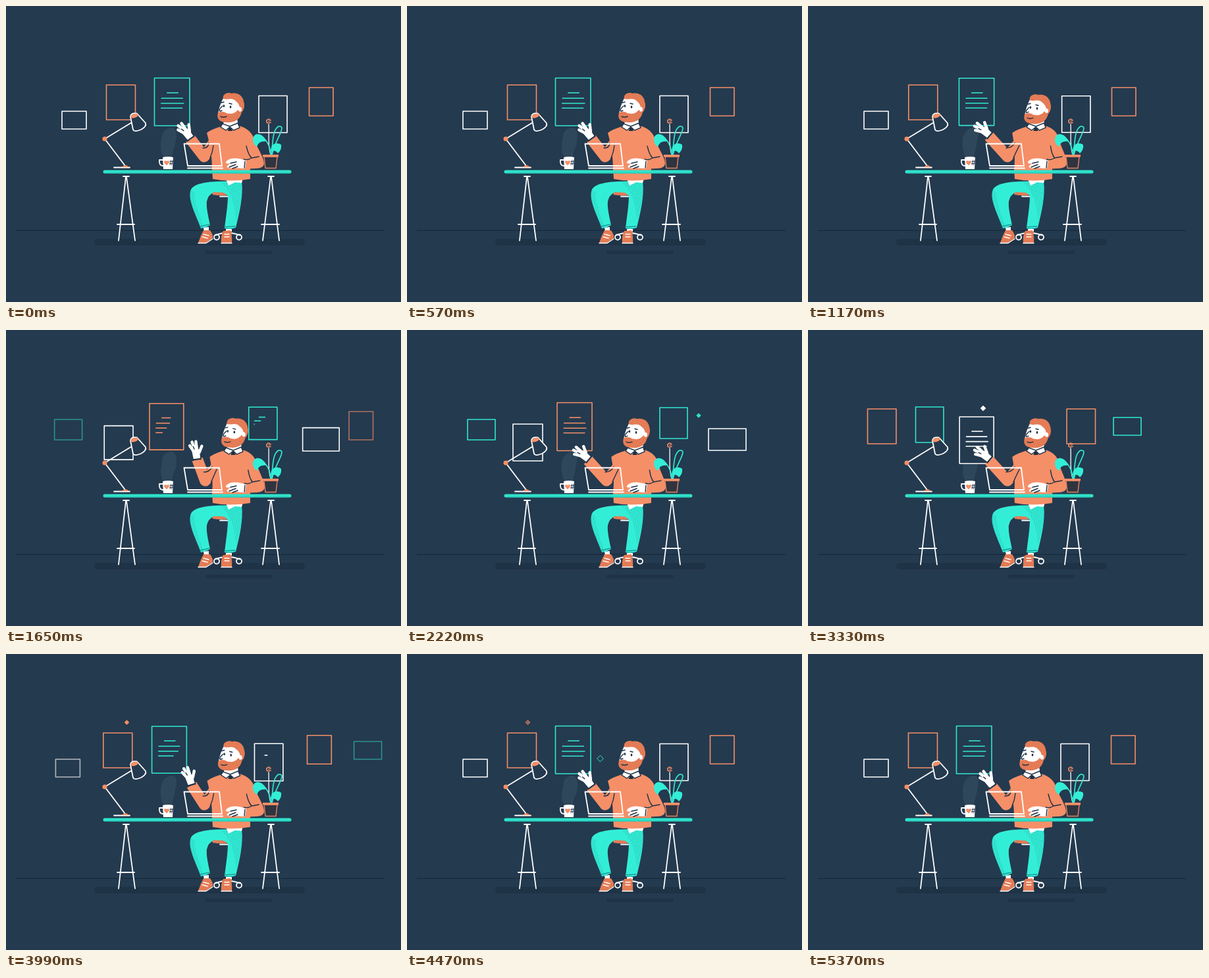
Write an HTML page that moves like this. It is 600 px wide and 450 px high and loops after 5.4 s.

```html
<!DOCTYPE html>
<html lang="en">
<head>
<meta charset="utf-8">
<title>Desk</title>
<style>
  html, body { margin: 0; width: 100%; height: 100%; overflow: hidden; background: #243a4f; }
  svg { display: block; width: 100vw; height: 100vh; }
  .line { fill: none; stroke-linecap: round; stroke-linejoin: round; }
  .white { stroke: #fff; stroke-width: 1.8; }
  .ink { stroke: #1d3044; stroke-width: 1.4; }
  .teal { stroke: #30e8cf; stroke-width: 1.7; }
  .orange { stroke: #f58f68; stroke-width: 1.6; }
  .o { fill: #f58f68; }
  .t { fill: #33eed6; }
  .w { fill: #fff; }
  .d { fill: #1d3044; }
  .shade { fill: #1f3346; }
  .hash { font: bold 11px "Liberation Sans", Arial, sans-serif; }
</style>
</head>
<body>
<svg viewBox="0 0 600 450">
  <defs>
    <pattern id="curls" width="4" height="4" patternUnits="userSpaceOnUse" patternTransform="rotate(25)">
      <rect width="4" height="4" fill="#ee845c"/>
      <circle cx="1" cy="1" r=".8" fill="#bd5a3c"/>
      <circle cx="3" cy="3" r=".7" fill="#bd5a3c"/>
    </pattern>
    <pattern id="denim" width="4" height="4" patternUnits="userSpaceOnUse" patternTransform="rotate(35)">
      <circle cx="1" cy="1" r=".7" fill="#1b9d9c"/>
      <circle cx="3" cy="3" r=".6" fill="#1b9d9c"/>
    </pattern>
  </defs>

  <!-- floor -->
  <rect class="shade" x="134" y="354" width="320" height="10" rx="5"/>
  <rect class="shade" x="303" y="372" width="102" height="5.500" rx="2.700"/>
  <path d="M15 341.300H575" stroke="#172a3c" stroke-width="1.200"/>

  <path id="steam" fill="#2e475b"/>
  <g id="cards"></g>
  <g id="sparks"></g>

  <!-- chair -->
  <path fill="url(#curls)" d="M312 281H340V287Q326 289 314 287Z"/>
  <path class="line white" d="M325 289.500H338M318 348.500Q336 341 355 348.500"/>
  <circle class="line white" cx="320" cy="351.500" r="4"/>
  <circle class="line white" cx="354" cy="351.500" r="4"/>

  <!-- legs -->
  <path class="t" d="M322 267L358 266C361 290 354 316 349 337Q341 340 332 338C334 320 337 303 337 288L330 283Z"/>
  <path class="t" d="M344 267C318 266 287 267 281 279C275 293 288 316 296 338Q304 337 310 333C307 319 304 306 305 297Q307 287 316 283L342 284Z"/>
  <path fill="url(#denim)" d="M326 268L358 267C361 290 354 312 350 326C347 312 347 298 340 287Q334 274 326 268Z"/>
  <path fill="url(#denim)" d="M281 281C276 293 288 316 296 338L300 337C293 314 286 297 286 283Z"/>
  <path class="line" d="M295 335L309 332M332 336L348 335" stroke="#1b9d9c" stroke-width="1.300"/>
  <path class="w" d="M300 337L308 336V342H301ZM334 339H343V343H334Z"/>
  <path fill="url(#curls)" d="M300 341L310 341Q315 348 314 353L304 360H292Q295 350 300 341ZM330 342L341 341Q344 350 343 360H327Q326 349 330 342Z"/>
  <path class="line" d="M292 360.500H304L314 354M327 360.500H343M300 347L308 349M298 351L306 353M332 347H339M332 351H339" stroke="#fff" stroke-width="1.400"/>

  <!-- hem -->
  <path class="w" d="M334 263L360 262L358 269L348 268L338 273Z"/>
  <path class="o" d="M313 246H371L371 263Q340 268 314 263Z"/>

  <g id="body">
    <path class="o" d="M305 193C312 187 322 185 329 182H353C366 185 374 192 378 205C383 219 392 230 392 240Q391 247 380 247L313 250C313 230 311 214 305 193Z"/>
    <path class="line ink" d="M365 213Q368 226 373 231L384 229M373 231Q367 235 361 233"/>
    <path class="w" d="M331 171L351 170L353 185L340 188L330 184Z"/>
    <path class="w ink" d="M329 179L326 184L334 189L340 184L346 189L355 185L352 178L340 183Z"/>
    <path class="d" d="M338 185L342 185L344 190H337Z"/>
  </g>
  <g id="head">
    <path class="w" d="M330 140C326 148 323 156 322 165L350 171L359 157C358 146 346 138 330 140Z"/>
    <path fill="url(#curls)" d="M330 141C328 134 337 130 343 133C352 131 360 137 361 145C363 151 362 157 358 162L355 156C355 149 351 146 346 142C340 140 335 143 330 141Z"/>
    <path fill="url(#curls)" d="M322 162Q330 159 335 163Q346 166 352 158L358 160C357 171 348 178 336 177C325 177 319 172 322 162Z"/>
    <ellipse class="w" cx="355.500" cy="157" rx="2.500" ry="3.500"/>
    <path class="line ink" d="M329 152Q322 158 325 160L328 159M326 168Q330 170 335 168M327 147L331 146M339 148L343 149"/>
    <ellipse class="d" cx="331" cy="152" rx="1.200" ry="1.900"/>
    <ellipse class="d" cx="341" cy="153.500" rx="1.300" ry="2"/>
  </g>

  <g id="arm">
    <path id="sleeve" class="line" stroke="#f58f68" stroke-width="17" style="stroke-linecap:butt"/>
    <path id="seam" class="line ink"/>
    <g id="hand">
      <path class="w" d="M-5 4L-6 -11Q0 -16 6 -11L5 4Z"/>
      <path class="line" d="M-4 -11L-8 -19M-1 -13L-4 -24M2 -13L2 -24M5 -7L10 -16" stroke="#fff" stroke-width="4.400"/>
      <path class="line ink" d="M-2 -13L-3 -17" stroke-width="1"/>
      <path class="line" d="M-6 3L6 3" stroke="#1d3044" stroke-width="2.200"/>
    </g>
  </g>

  <!-- typing hand -->
  <path class="w" d="M365 235Q352 230 342 232Q333 235 334 239Q338 240 341 239L335 244Q338 248 345 246L363 247Z"/>
  <path class="line ink" d="M341 239L350 237M339 245L349 241M344 247L352 244M363 236L362 246"/>

  <!-- laptop -->
  <path class="line white" d="M270.500 209.500H324L328 243H276ZM276 246.500H329"/>

  <!-- plant -->
  <g id="plant">
    <path class="line" d="M402 226C397 210 400 195 399 180" stroke="#fff" stroke-width="1.300"/>
    <path class="line orange" d="M402 174Q399 170 396 174Q395 178 399 178L402 177M399 175H400"/>
    <path class="line teal" d="M402 226C401 211 395 202 386 198M403 226C406 208 404 189 414 183Q421 182 418 190C415 199 408 209 404 226M403 226Q404 220 410 216"/>
    <path class="t" d="M396 206C390 193 377 191 375 202Q375 210 381 214Q384 204 396 206ZM402 221C402 209 411 206 418 211Q419 219 413 224Q409 218 402 221Z"/>
    <path d="M392 229H412L410 246.500H394Z" fill="#30343f" stroke="#e5835f" stroke-width="1.400"/>
    <path class="o" d="M390 226H414V229.500H390Z"/>
  </g>

  <!-- table -->
  <g class="line white">
    <path d="M178 259H187M182 260L171 356.500M183 260L196 356.500M169 332H195"/>
    <path d="M398 259H407M402 260L390 356.500M403 260L415 356.500M388 332H415"/>
  </g>
  <path class="line" d="M150 252H431" stroke="#30e3ca" stroke-width="5"/>
  <path class="line" d="M152 254H430" stroke="#21bfb0" stroke-width="1"/>

  <!-- lamp -->
  <g id="lamp">
    <path class="line white" d="M181 243L150 202L191 177M164 245.500H188"/>
    <path class="o" d="M176 245Q181 239 187 245Z"/>
    <circle class="o" cx="150" cy="202" r="3.500"/>
    <path class="line white" style="fill:#243a4f" d="M189 168Q190 162 199 163.500L212 178Q214 183 205 188Q195 192 193 188Z"/>
    <ellipse class="o" cx="195" cy="167" rx="6" ry="3" transform="rotate(-18 195 167)"/>
  </g>

  <!-- mug -->
  <path class="line white" d="M239 234H233Q232 243 239 243"/>
  <path class="w" d="M238 230Q246 228 254 230L253 248H239Z"/>
  <path class="o" d="M244 242.500L240 238Q240 233.500 244 236Q248 233.500 248 238Z"/>
  <text class="hash d" x="248" y="242">#</text>
</svg>

<script>
const LOOP = 5400;
const $ = id => document.getElementById(id);
const clamp = v => Math.max(0, Math.min(1, v));
const mix = (a, b, p) => a + (b - a) * p;
const smooth = p => p * p * (3 - 2 * p);

function make(parent, tag, attrs) {
  const el = document.createElementNS('http://www.w3.org/2000/svg', tag);
  set(el, attrs);
  return parent.appendChild(el);
}
function set(el, attrs) {
  for (const name in attrs) el.setAttribute(name, attrs[name]);
}

// Same curve as cubic-bezier(.4, 0, .1, 1)
function glide(x) {
  let lo = 0, hi = 1;
  for (let n = 0; n < 24; n++) {
    const s = (lo + hi) / 2, r = 1 - s;
    if (1.2 * r * r * s + .3 * r * s * s + s * s * s < x) lo = s; else hi = s;
  }
  return lo * lo * (3 - 2 * lo);
}

// Cards step one slot to the right on every swipe: [x, y, width, height] per slot
const swipes = [1080, 2210, 3310], swipeTime = 950;
const delays = [165, 75, 50, 0, 5, 20];
const lanes = [
  { color: '#fff', first: [-2, 1, 4], slots: [
    [85, 160, 37, 27], [161, 143, 45, 56], [230, 132, 52, 71], [384, 136.5, 43, 56], [458, 150, 57, 33]] },
  { color: '#f58f68', first: [-1, 2, 5], slots: [
    [90.5, 120, 43.5, 53], [152.5, 120, 44, 53], [228, 110.5, 53, 73], [393, 120, 43.5, 53], [460.5, 124, 36.5, 43]] },
  { color: '#30e8cf', first: [0, 3], slots: [
    [92, 136, 42, 31], [163.5, 117, 42.5, 54], [225.5, 109.5, 53.5, 72.5], [384, 118, 42, 47], [464, 133, 42, 27]] }
];
const cards = [];
for (const { color, first, slots } of lanes) {
  const shifted = ([x, ...rest], dx) => [x + dx, ...rest];
  const path = [shifted(slots[0], -70), ...slots, shifted(slots[4], 68)];
  for (const start of first) {
    const g = make($('cards'), 'g', { stroke: color, 'stroke-width': 1.6, 'stroke-linejoin': 'round' });
    const rect = make(g, 'rect', { fill: '#243a4f' });
    const lines = [0, 1, 2, 3].map(() => make(g, 'path', {}));
    cards.push({ start, path, g, rect, lines });
  }
}
// Text lines inside the middle card: left, top and length as shares of its size
const rows = [[.35, .31, .33], [.19, .425, .62], [.18, .53, .66], [.18, .63, .62]];

function drawCard({ start, path, g, rect, lines }, t) {
  const k = swipes.filter(s => s <= t).length - 1;
  const i = start + Math.max(k, 0);
  const shown = i >= 0 && i <= 5;
  g.style.display = shown ? '' : 'none';
  if (!shown) return;
  const u = k < 0 ? 0 : clamp((t - swipes[k] - delays[i]) / swipeTime);
  const p = glide(u);
  const [x, y, width, height] = path[i].map((v, n) => mix(v, path[i + 1][n], p));
  set(rect, { x, y, width, height });
  set(g, { opacity: i === 0 ? clamp(u * 1.2) : i === 5 ? 1 - u * u : 1 });
  lines.forEach((line, j) => {
    const size = i === 2 ? clamp((u - .3 - .05 * j) / .3)
      : i === 3 ? 1 - clamp((u - .515 + .1 * j) / .3) : 0;
    const [left, top, len] = rows[j];
    set(line, {
      d: `M${x + left * width} ${y + top * height}h${len * width * size}`,
      visibility: size ? 'visible' : 'hidden'
    });
  });
}

// Sparks: x, y, radius, start, life, colour
const sparks = [
  [443, 130, 3.2, 1900, 700, '#30e8cf'],
  [266, 119, 3.8, 3030, 700, '#fff'],
  [183.5, 104, 3.2, 3750, 1300, '#f58f68'],
  [293.5, 159, 4.8, 4000, 700, '#30e8cf']
].map(([x, y, r, start, life, color]) => ({
  x, y, r, start, life,
  el: make($('sparks'), 'path', { fill: color, stroke: color, 'stroke-width': 1 })
}));

function drawSpark({ x, y, r, start, life, el }, t) {
  const age = (t - start) / life;
  const size = r * smooth(clamp(age / .15));
  set(el, {
    d: `M${x} ${y - size}l${size} ${size}l${-size} ${size}l${-size} ${-size}z`,
    'fill-opacity': 1 - clamp((age - .45) / .2),
    opacity: age > 0 && age < 1 ? clamp((1 - age) / .2) : 0
  });
}

// Pose keys: time, lean, wrist x, wrist y, hand angle
const idle = [0, 279, 199, -36], reach = [1, 274, 195, -50], swing = [.75, 297, 193, 12];
const keys = [
  [0, ...idle], [700, ...idle], [1110, ...reach], [1180, ...reach],
  [1470, ...swing], [1950, ...reach], [2240, ...reach],
  [2540, ...swing], [3020, ...reach], [3340, ...reach],
  [3620, ...swing], [3980, .1, 281, 196, -17], [4400, ...idle], [LOOP, ...idle]
];

function drawMan(t) {
  const n = keys.findIndex(key => key[0] > t);
  const a = keys[n - 1], b = keys[n];
  const p = smooth((t - a[0]) / (b[0] - a[0]));
  const [, lean, wx, wy, turn] = a.map((v, j) => mix(v, b[j], p));
  const skew = .092 * lean;
  set($('body'), { transform: `matrix(1 0 ${-skew} 1 ${250 * skew} 0)`.replace('--', '') });
  set($('head'), { transform: `translate(${7 * lean} ${2.2 * lean})` });
  const sx = 315 + 6 * lean, ex = 301 + 2 * lean;
  set($('sleeve'), { d: `M${sx + 4} 203L${ex} 229L${wx + 1} ${wy + 3}` });
  set($('seam'), { d: `M${sx - 7} 208Q${ex + 7} 216 ${ex - 2} 216M${ex + 9} 231Q${ex + 13} 222 ${sx} 212` });
  set($('hand'), { transform: `translate(${wx} ${wy}) rotate(${turn})` });
}

function drawSteam(t) {
  const w = 1.2 * Math.sin(t / LOOP * Math.PI * 8);
  set($('steam'), {
    d: `M240 230C${233 - w} 222 ${235 + w} 208 ${236 + w} 200C${238 - w} 189 245 184 ${254 - w} 185` +
       `C${262 - w} 190 ${258 + w} 200 ${257 + w} 210C${255 - w} 218 252 224 252 230Z`
  });
}

function draw(now) {
  const t = now % LOOP;
  cards.forEach(card => drawCard(card, t));
  sparks.forEach(spark => drawSpark(spark, t));
  drawMan(t);
  drawSteam(t);
  requestAnimationFrame(draw);
}
draw(0);
</script>
</body>
</html>
```
